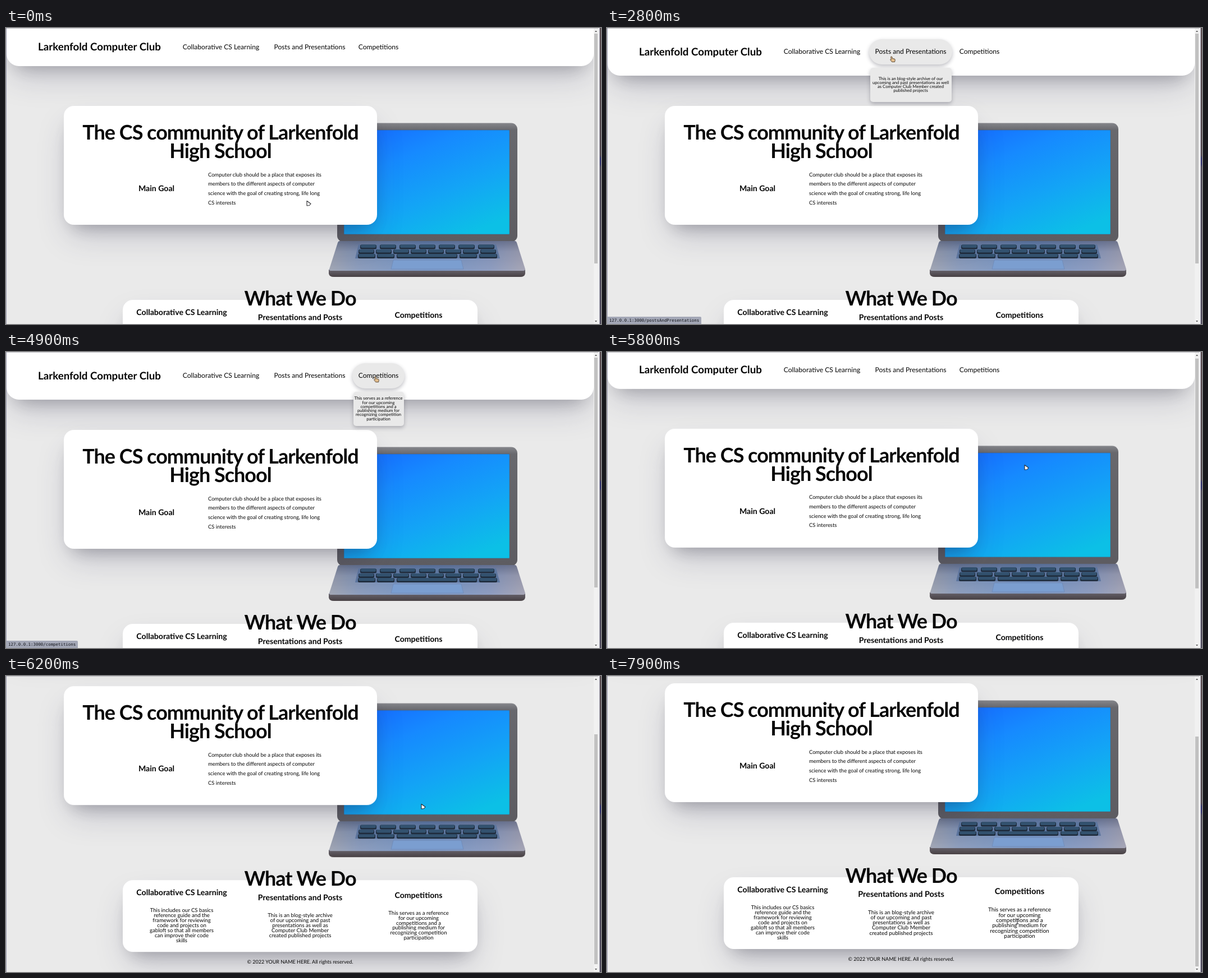
Recreate the animation shown at these times as an HTML page. Size 1060x528 px, loop 8000 ms.

```html
<!DOCTYPE html>
<html lang="en">
<head>
<meta charset="utf-8">
<title>Computer Club</title>
<style>
html, body { margin: 0; width: 1060px; height: 528px; overflow: hidden; background: #eaeaea; }
#stage { position: relative; width: 1060px; height: 528px; overflow: hidden; font-family: Lato, "Open Sans", sans-serif; }
#stage div, #stage svg { position: absolute; }
svg { left: 0; top: 0; width: 1060px; height: 528px; overflow: visible; text-rendering: geometricPrecision; }
#page, #nav, .menu { left: 0; top: 0; width: 1060px; height: 528px; }

.panel {
  background: #fff; border-radius: 18px;
  box-shadow: 0 27px 55px -11px rgba(50,50,93,.25), 0 16px 33px -16px rgba(0,0,0,.3);
}
#header { left: 1px; top: 0; width: 1046px; height: 68px; border-radius: 0 0 22px 22px; }
#hero { left: 102.5px; top: 138.5px; width: 558.5px; height: 212.5px; }
#work { left: 208px; top: 485px; width: 632px; height: 127.5px; }
.pill, .drop { background: #e9e9e9; box-shadow: 0 3px 7px rgba(20,20,40,.28); }
.pill { top: 20px; height: 45px; border-radius: 23px; }
.drop { top: 71px; height: 61px; border-radius: 5px; }

text { fill: #050505; text-anchor: middle; }
.big { font-size: 36px; font-weight: 700; letter-spacing: -1px; }
.title { font-size: 18.7px; font-weight: 700; text-anchor: start; }
.sub { font-size: 14.1px; font-weight: 700; }
.link { font-size: 12.1px; }
.para { font-size: 9.45px; text-anchor: start; }
.note { font-size: 9.6px; }
.foot { font-size: 9px; }
.tiny { font-size: 7.7px; }

.status {
  left: 0; bottom: 0; height: 13px; padding: 0 4px; background: #a3a7b6; color: #14161c;
  border-top-right-radius: 2px; font: 7.4px/13px "DejaVu Sans Mono", monospace; white-space: pre;
}
#bar { left: 1047px; top: 0; width: 8px; height: 528px; background: #f1f1f1; }
#thumb { left: 1px; top: 10px; width: 6px; height: 410px; background: #c1c1c1; }
#strip { left: 1055px; top: 0; width: 5px; height: 528px;
  background: linear-gradient(90deg, #eeeef0 30%, #a9a9b8 40% 55%, transparent 60%),
    linear-gradient(#5a4c4f, #4d4248 43%, #30306c 44% 46%, #4a4453 47%, #4f4a5c); }
#top { left: 0; top: 0; width: 1055px; height: 1px; background: #bcbcc2; }
#left { left: 0; top: 0; width: 1px; height: 528px; background: #9c9cb2; }
#cursor { left: 0; top: 0; width: 0; height: 0; }
#cursor svg { width: 1px; height: 1px; }

#page, #thumb, #header, #nav, .menu, .status, .item, #cursor { animation: 8s linear infinite; }
#page { animation-name: scroll; }
#thumb { animation-name: thumb; }
#header { animation-name: grow; }
#nav { animation-name: sink; }
.m0 { animation-name: menu0; }
.m1 { animation-name: menu1; }
.m2 { animation-name: menu2; }
#i0 { animation-name: zoom0; transform-origin: 313px 550px; }
#i1 { animation-name: zoom1; transform-origin: 524px 550px; }
#i2 { animation-name: zoom2; transform-origin: 735px 550px; }
#cursor { animation-name: move; }
#arrow { animation: arrow 8s step-end infinite; }
#beam { animation: beam 8s step-end infinite; }
#hand { animation: hand 8s step-end infinite; }

@keyframes scroll {
  0%, 71.5% { transform: none; animation-timing-function: cubic-bezier(.65,0,.35,1); }
  79%, 100% { transform: translateY(-126px); }
}
@keyframes thumb {
  0%, 71.5% { transform: none; animation-timing-function: cubic-bezier(.65,0,.35,1); }
  79%, 100% { transform: translateY(98px); }
}
@keyframes grow {
  0%, 16.375% { height: 68px; animation-timing-function: ease; }
  18.875%, 66.25% { height: 84.5px; animation-timing-function: ease; }
  68.75%, 100% { height: 68px; }
}
@keyframes sink {
  0%, 16.375% { transform: translateY(-8.25px); animation-timing-function: ease; }
  18.875%, 66.25% { transform: none; animation-timing-function: ease; }
  68.75%, 100% { transform: translateY(-8.25px); }
}
@keyframes menu0 {
  0%, 18.6% { opacity: 0; }
  21%, 34.98% { opacity: 1; }
  34.99%, 100% { opacity: 0; }
}
@keyframes menu1 {
  0%, 34.98% { opacity: 0; }
  34.99%, 53% { opacity: 1; }
  54.5%, 100% { opacity: 0; }
}
@keyframes menu2 {
  0%, 53.5% { opacity: 0; }
  55%, 64% { opacity: 1; }
  66%, 100% { opacity: 0; }
}
@keyframes zoom0 {
  0%, 86.5% { transform: none; }
  89.5%, 92% { transform: scale(1.05); }
  95.5%, 100% { transform: none; }
}
@keyframes zoom1 {
  0%, 92% { transform: none; }
  94.5%, 97.2% { transform: scale(1.05); }
  99.8%, 100% { transform: none; }
}
@keyframes zoom2 {
  0%, 96.8% { transform: none; }
  99.2%, 100% { transform: scale(1.05); }
}
@keyframes move {
  0%, 5.6% { transform: translate(539px,313px); }
  10% { transform: translate(492px,232px); }
  16.25% { transform: translate(394px,78px); }
  17.5% { transform: translate(391px,68px); }
  20% { transform: translate(386px,56px); }
  25%, 34.98% { transform: translate(383px,51px); }
  34.99% { transform: translate(509px,56px); }
  37.5%, 49.5% { transform: translate(514px,51px); }
  57.5%, 60.5% { transform: translate(657px,51px); }
  61.25% { transform: translate(660px,49px); }
  65.5% { transform: translate(692px,112px); }
  71.25% { transform: translate(745px,203px); }
  72.5% { transform: translate(747px,206px); }
  77.5%, 83% { transform: translate(743px,233px); }
  86.25% { transform: translate(335px,426px); }
  90.5% { transform: translate(352px,433px); }
  92.5% { transform: translate(500px,437px); }
  96% { transform: translate(575px,439px); }
  98.75%, 100% { transform: translate(731px,438px); }
}
@keyframes arrow {
  0% { opacity: 1; } 7.5% { opacity: 0; } 12.5% { opacity: 1; }
  17.2% { opacity: 0; } 65% { opacity: 1; } 86%, 100% { opacity: 0; }
}
@keyframes beam {
  0% { opacity: 0; } 7.5% { opacity: 1; } 12.5% { opacity: 0; }
  17.2% { opacity: 1; } 18.6% { opacity: 0; } 86%, 100% { opacity: 1; }
}
@keyframes hand {
  0% { opacity: 0; } 18.6% { opacity: 1; } 65%, 100% { opacity: 0; }
}
</style>
</head>
<body>
<div id="stage">
  <div id="page">
    <div id="header" class="panel"></div>
    <svg id="laptop">
      <defs>
        <linearGradient id="screen" x1=".1" y1="0" x2=".75" y2="1">
          <stop offset="0" stop-color="#166cff"/><stop offset=".3" stop-color="#168aff"/>
          <stop offset=".65" stop-color="#13a4f6"/><stop offset="1" stop-color="#0cc0e6"/>
        </linearGradient>
        <linearGradient id="lid" x2="0" y2="1">
          <stop offset="0" stop-color="#85868b"/><stop offset=".06" stop-color="#68686d"/><stop offset="1" stop-color="#5d5c61"/>
        </linearGradient>
        <linearGradient id="deck">
          <stop offset="0" stop-color="#9a9fae"/><stop offset=".15" stop-color="#8496b8"/>
          <stop offset=".5" stop-color="#6f90c2"/><stop offset=".82" stop-color="#8595bb"/><stop offset="1" stop-color="#a09fb0"/>
        </linearGradient>
        <linearGradient id="shade" x2="0" y2="1">
          <stop offset="0" stop-color="#2c3550" stop-opacity=".4"/><stop offset=".35" stop-color="#2c3550" stop-opacity=".08"/>
          <stop offset="1" stop-color="#fff" stop-opacity=".08"/>
        </linearGradient>
        <linearGradient id="front" x2="0" y2="1">
          <stop offset="0" stop-color="#67636c"/><stop offset="1" stop-color="#484144"/>
        </linearGradient>
        <path id="base" d="M594 380H907Q909 380 910 383L925 430Q925 433 921 433H579Q575 433 576 430L591 383Q592 380 594 380Z"/>
      </defs>
      <rect x="590" y="169.500" width="321" height="212" rx="11" fill="url(#lid)"/>
      <rect x="602" y="182" width="295" height="186" rx="1" fill="url(#screen)" stroke="#46607c" stroke-width=".6"/>
      <path d="M575 431H925V438Q924 444 916 444H584Q576 444 575 438Z" fill="url(#front)"/>
      <use href="#base" fill="url(#deck)"/>
      <use href="#base" fill="url(#shade)"/>
      <path d="M628 386H873L880 411H622Z" fill="#5d769e"/>
      <g id="keys"></g>
      <path d="M690 414H811L815 430H686Z" fill="#7b9ed0" stroke="#6d89b6" stroke-width=".7"/>
    </svg>
    <div id="hero" class="panel"></div>
    <div id="work" class="panel"></div>
    <svg id="copy"><g id="i0" class="item"></g><g id="i1" class="item"></g><g id="i2" class="item"></g></svg>
    <div id="nav"><svg id="links"></svg></div>
  </div>
  <div id="bar"><div id="thumb"></div>
    <svg><path d="M2 7L4 4.500L6 7Z M2 522L4 524.500L6 522Z" fill="#555"/></svg>
  </div>
  <div id="strip"></div><div id="top"></div><div id="left"></div>
  <div id="cursor"><svg>
    <g id="arrow"><path d="M-3 -4.500L4 .5L1.500 3.500L-3 4Z" fill="#fff" stroke="#2a2a2e" stroke-width="1.100" stroke-linejoin="round"/></g>
    <g id="beam"><path d="M-2.500 -4H2.500M-2.500 4H2.500M0 -4V4" fill="none" stroke="#55555a" stroke-width="1.300"/></g>
    <g id="hand"><path d="M-3.500 -4.500Q-2 -6 -1 -4L-.5 -1.500L3 -1Q4.500 -.5 4.200 1.500L3.500 4.500H-1.500L-4.500 .5Q-4 -1 -2.500 0Z" fill="#e3bd8c" stroke="#4a3a2a" stroke-width=".9" stroke-linejoin="round"/></g>
  </svg></div>
</div>
<script>
const $ = id => document.getElementById(id);
const SVG = 'http://www.w3.org/2000/svg';

function shape(parent, tag, attrs) {
  const el = document.createElementNS(SVG, tag);
  for (const k in attrs) el.setAttribute(k, attrs[k]);
  return parent.appendChild(el);
}
function write(parent, cls, x, y, lines, step = 0) {
  lines.split('|').forEach((s, i) => {
    shape(parent, 'text', { class: cls, x, y: y + i * step }).textContent = s;
  });
}
function box(parent, cls, left, width) {
  const el = document.createElement('div');
  el.className = cls;
  if (width) Object.assign(el.style, { left: left + 'px', width: width + 'px' });
  return parent.appendChild(el);
}

function key(x, y, w) {
  shape($('keys'), 'rect', { x, y, width: w, height: 8, rx: 2.5, fill: '#1f2b3b' });
  shape($('keys'), 'rect', { x: x + 1, y, width: w - 2, height: 5.5, rx: 2, fill: '#33526f' });
}
for (let i = 0; i < 7; i++) key(631 + i * 35, 386.5, 29);
for (let i = 0; i < 8; i++) key(628 + i * 31, 395, 28);
[[627, 31], [661, 31], [696, 108], [808, 31], [843, 32]].forEach(([x, w]) => key(x, 403, w));

const copy = $('copy');
write(copy, 'big', 382, 199, 'The CS community of Larkenfold|High School', 33);
write(copy, 'sub', 268, 291, 'Main Goal');
write(copy, 'para', 360, 264.5, 'Computer club should be a place that exposes its|members to the different aspects of computer|science with the goal of creating strong, life long|CS interests', 16.7);
write(copy, 'big', 524, 495, 'What We Do');
write(copy, 'foot', 524, 634, '© 2022 YOUR NAME HERE. All rights reserved.');

const items = [
  [313, 512, 'Collaborative CS Learning', 542, 'This includes our CS basics|reference guide and the|framework for reviewing|code and projects on|gabloft so that all members|can improve their code|skills'],
  [524, 521, 'Presentations and Posts', 551, 'This is an blog-style archive|of our upcoming and past|presentations as well as|Computer Club Member|created published projects'],
  [735, 516.5, 'Competitions', 546.5, 'This serves as a reference|for our upcoming|competitions and a|publishing medium for|recognizing competition|participation'],
];
items.forEach(([x, y, head, y2, body], i) => {
  write($('i' + i), 'sub', x, y, head);
  write($('i' + i), 'note', x, y2, body, 8.95);
});

const menus = [
  [301, 164, 'Collaborative CS Learning', 'collaborativeLearning', 'This includes our CS basics reference|guide and the framework for reviewing|code and projects on gabloft so that all|members can improve their code skills'],
  [467, 148, 'Posts and Presentations', 'postsAndPresentations', 'This is an blog-style archive of our|upcoming and past presentations as well|as Computer Club Member created|published projects'],
  [617, 93, 'Competitions', 'competitions', 'This serves as a reference|for our upcoming|competitions and a|publishing medium for|recognizing competition|participation'],
];
write($('links'), 'title', 57, 48.5, 'Larkenfold Computer Club');
menus.forEach(([x, w, label, path, body], i) => {
  const mid = x + w / 2, rows = body.split('|').length;
  write($('links'), 'link', mid, 46, label);
  const menu = box($('nav'), 'menu m' + i);
  box(menu, 'pill', x, w);
  box(menu, 'drop', x + 1.5, w - 3);
  const art = shape(menu, 'svg', {});
  write(art, 'link', mid, 46, label);
  write(art, 'tiny', mid, 103.5 - (rows - 1) * 3.625, body, 7.25);
  const status = box($('stage'), 'status m' + i);
  status.textContent = '127.0.0.1:3000/' + path;
});
$('stage').append($('cursor'));
</script>
</body>
</html>
```
